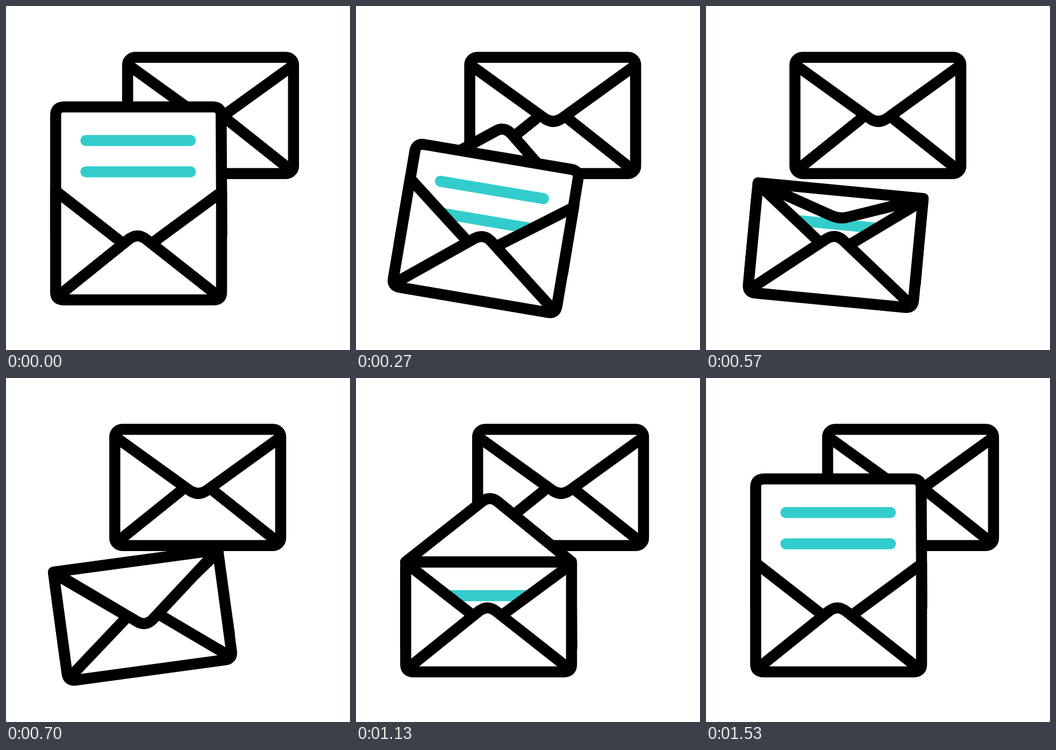
Write an HTML page with a canvas that moves like this. It is 640 by 640 pixels and loops after 1.77 s.

```html
<!DOCTYPE html>
<html lang="en">
<head>
<meta charset="utf-8">
<title>Mail</title>
<style>
  html, body { margin: 0; height: 100%; overflow: hidden; background: #fff; }
  canvas { display: block; width: 100vw; height: 100vh; }
</style>
</head>
<body>
<canvas id="stage" width="640" height="640"></canvas>
<script>
const ctx = document.getElementById('stage').getContext('2d');
const LOOP_MS = 1770;
const STEPS_PER_MS = 0.03;
const INK = '#000';
const PAPER = '#fff';
const ACCENT = '#33cccc';
const PIVOT = { x: 232, y: 383 };

// Keyframes as [step, value], eased in and out between neighbours.
const backShift = [[5, 0], [15, -67.9], [25, 0]];
const tilt = [[0, 0], [4.2, -9.6], [8, 9.6], [12, -9.6], [15.8, 9.6], [19.8, -9.6], [24, 0]];
const letterDrop = [[1.25, 0], [13.5, 1], [36, 1], [46, 0]];
const flapFold = [[11.5, -1], [20, 1], [25.5, 1], [34, -1]];

function valueAt(keys, step) {
  if (step <= keys[0][0]) return keys[0][1];
  for (let i = 1; i < keys.length; i++) {
    const [t0, v0] = keys[i - 1];
    const [t1, v1] = keys[i];
    if (step < t1) {
      const u = (step - t0) / (t1 - t0);
      return v0 + (v1 - v0) * u * u * (3 - 2 * u);
    }
  }
  return keys[keys.length - 1][1];
}

function shape(path, { fill, stroke = INK } = {}) {
  const p = new Path2D(path);
  if (fill) {
    ctx.fillStyle = fill;
    ctx.fill(p);
  }
  if (stroke) {
    ctx.strokeStyle = stroke;
    ctx.stroke(p);
  }
}

function drawBackEnvelope(shift) {
  ctx.save();
  ctx.translate(shift, 0);
  const body = new Path2D();
  body.roundRect(226.3, 95.5, 308.6, 216.2, 14);
  ctx.fillStyle = PAPER;
  ctx.fill(body);
  ctx.strokeStyle = INK;
  ctx.stroke(body);
  shape('M232 113 L366 209.5 Q381.5 220 397 209.5 L530 113.5');
  shape('M232 304 L349 210 M530 305.5 L411 211');
  ctx.restore();
}

function drawFlap(fold) {
  const base = 342;
  const shoulder = base + 112.5 * fold;
  const tip = base + 123 * fold;
  shape(`M92.4 ${base} L235 ${shoulder} Q249 ${tip} 263 ${shoulder} L401 ${base} Z`, { fill: PAPER });
}

function drawLetter(drop) {
  const fall = 154.7 * drop;
  const top = 187.8 + fall;
  const end = 427 + 75 * drop;
  shape(`M92.4 ${end} V${top + 15} Q92.4 ${top} 108 ${top} H385 ` +
        `Q400.2 ${top} 400.3 ${top + 15} L401.4 ${end}`, { fill: PAPER });
  for (const y of [250.2, 308.6]) {
    shape(`M148.6 ${y + fall} H343`, { stroke: ACCENT });
  }
}

function drawPocket() {
  shape('M92.4 344 L213 438 L98 539 Z M401 346 L276 438 L394 539 Z', { fill: PAPER, stroke: null });
  shape('M92.4 344 L213 438 M401 346 L276 438');
  shape('M98 539 L226 436 Q244 420 262 435 L394 539', { fill: PAPER });
  shape('M92.4 344 V532.5 Q92.4 546.7 106.5 546.7 H387 Q401 546.7 401 532.5 V346');
}

function drawFrontEnvelope(step) {
  const fold = valueAt(flapFold, step);
  ctx.save();
  ctx.translate(PIVOT.x, PIVOT.y);
  ctx.rotate(valueAt(tilt, step) * Math.PI / 180);
  ctx.translate(-PIVOT.x, -PIVOT.y);
  if (fold < 0) drawFlap(fold);
  drawLetter(valueAt(letterDrop, step));
  drawPocket();
  if (fold >= 0) drawFlap(fold);
  ctx.restore();
}

function render() {
  const time = performance.now() % LOOP_MS;
  const step = Math.floor((time + 3.5) * STEPS_PER_MS);
  ctx.fillStyle = PAPER;
  ctx.fillRect(0, 0, 640, 640);
  ctx.lineWidth = 20.5;
  ctx.lineCap = ctx.lineJoin = 'round';
  drawBackEnvelope(valueAt(backShift, step));
  drawFrontEnvelope(step);
  requestAnimationFrame(render);
}

render();
</script>
</body>
</html>
```
